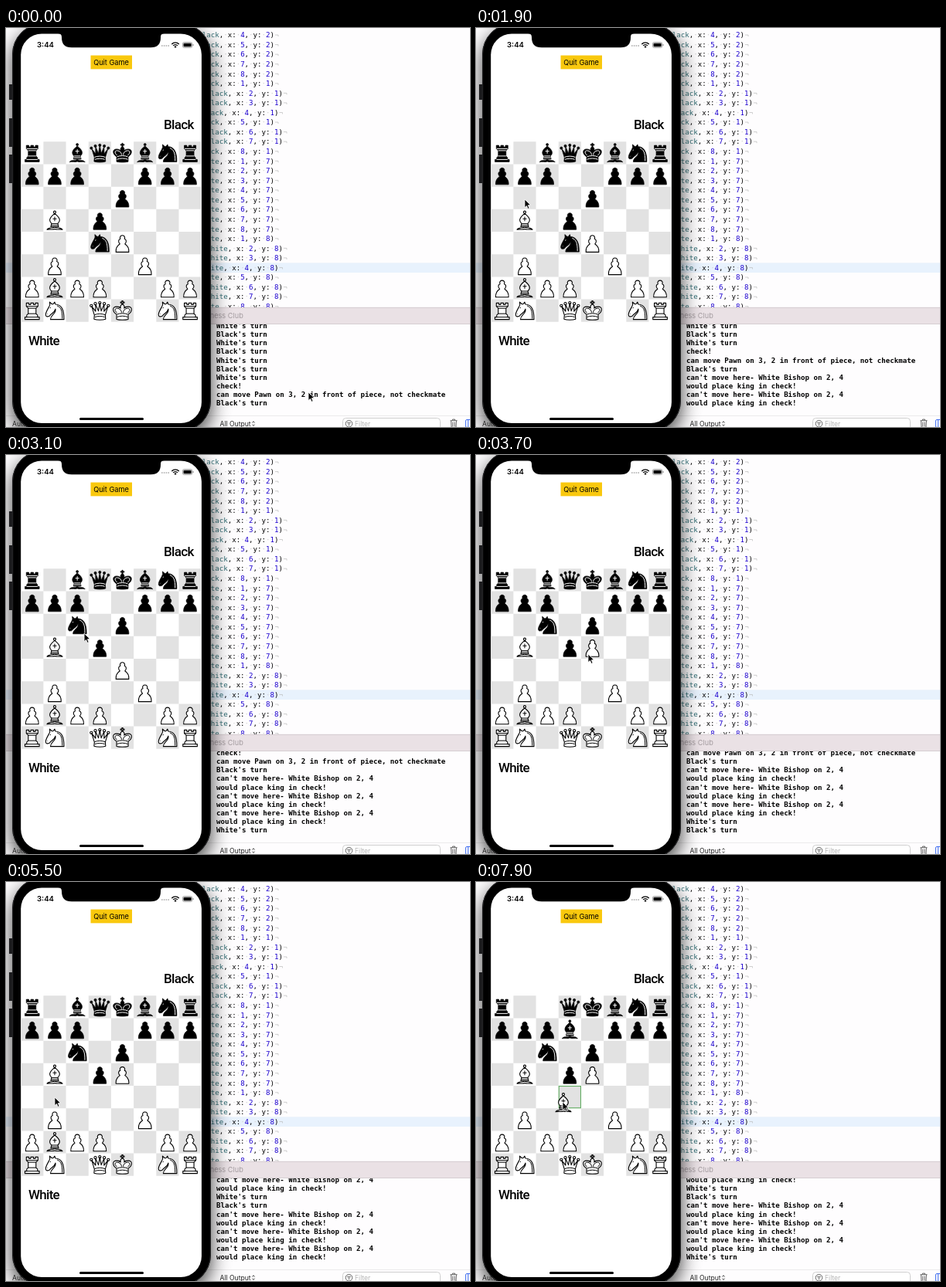
An HTML page for the animation above (8 s loop, 600 by 517 pixels).

```html
<!DOCTYPE html>
<html lang="en">
<head>
<meta charset="utf-8">
<title>Chess game</title>
<style>
  html, body { margin: 0; width: 100%; height: 100%; overflow: hidden; background: #fff; }
  svg { display: block; width: 600px; height: 517px; }
  text { white-space: pre; }
  .mono { font-family: "DejaVu Sans Mono", "Noto Sans Mono", monospace; font-size: 9.12px; }
  .ui { font-family: Inter, Roboto, sans-serif; }
  .side { font: 500 17px Roboto, sans-serif; letter-spacing: -.7px; }
</style>
</head>
<body>
<svg id="stage" viewBox="0 0 600 517">
  <defs>
    <filter id="blur" x="-40%" y="-40%" width="180%" height="180%"><feGaussianBlur stdDeviation="13"/></filter>
    <clipPath id="codeClip"><rect width="600" height="362"/></clipPath>
    <clipPath id="logClip"><rect x="265" y="384" width="335" height="118"/></clipPath>
  </defs>

  <rect width="600" height="517" fill="#fefdfe"/>
  <rect y="304.3" width="600" height="12.7" fill="#e8f2fd"/>
  <g id="code" class="mono" clip-path="url(#codeClip)"></g>

  <rect y="362" width="600" height="21.5" fill="#eae1e5"/>
  <path d="M0 362.3H600M0 383.5H600" stroke="#cfc6ca" stroke-width=".8"/>
  <text class="ui" x="257" y="376.3" font-size="9.2" fill="#a59da1">Chess Club</text>
  <g id="log" class="mono" font-weight="700" clip-path="url(#logClip)"></g>

  <g class="ui" font-size="8.6">
    <path d="M0 502.5H600" stroke="#e6e6e6" stroke-width=".8"/>
    <text x="8" y="515.5" fill="#333">Auto</text>
    <text x="276.5" y="515.5" fill="#222">All Output</text>
    <path d="M318.5 511.5l1.5-1.8 1.5 1.8M318.5 513.7l1.5 1.8 1.5-1.8" fill="none" stroke="#333" stroke-width=".9"/>
    <rect x="435.5" y="505.5" width="126" height="15" rx="4" fill="#fff" stroke="#c9c9c9" stroke-width=".9"/>
    <circle cx="443.5" cy="512.7" r="4.3" fill="none" stroke="#555" stroke-width=".9"/>
    <path d="M441 511.2h5M441.8 512.9h3.4M442.6 514.6h1.8" stroke="#555" stroke-width=".8"/>
    <text x="451" y="515.8" fill="#b4b4b4">Filter</text>
    <path d="M574.5 508.7h9M577.5 508.5v-1.4h3v1.4M575.5 509l.6 9h5.8l.6-9M577.8 510.5v6M580.2 510.5v6" fill="none" stroke="#555" stroke-width=".9"/>
    <rect x="594.5" y="507.5" width="12" height="10" rx="1.5" fill="none" stroke="#3f6df0"/>
    <path d="M597.5 508v9" stroke="#3f6df0"/>
  </g>

  <rect x="8" y="4" width="257" height="529" rx="40" opacity=".75" filter="url(#blur)"/>
  <path d="M6 73v20M6 117v37M6 164v37" stroke="#1c1c1e" stroke-width="4"/>
  <rect x="8" y="-6" width="257" height="529" rx="40" fill="#000"/>
  <rect x="8.7" y="-5.3" width="255.6" height="527.6" rx="39" fill="none" stroke="#2c2c2e"/>
  <rect x="19.2" y="7.5" width="233.7" height="504.5" rx="27" fill="#fff"/>
  <path d="M67 7C71 7.3 72 9 72 12C72 21 76 25.3 85 25.3H187C196 25.3 200 21 200 12C200 9 201 7.3 205 7Z"/>

  <text class="ui" x="40" y="25" font-size="9.6" font-weight="600">3:44</text>
  <path d="M201 23h10" stroke="#aaa" stroke-width="1.6" stroke-dasharray="1.6 1.2"/>
  <path d="M214.3 21a6.3 6.3 0 0 1 9.4 0M216.1 22.9a3.9 3.9 0 0 1 5.8 0" fill="none" stroke="#000" stroke-width="1.4"/>
  <path d="M217.5 24.2a2 2 0 0 1 3 0l-1.5 1.8z"/>
  <rect x="228.4" y="18.6" width="12.4" height="6.8" rx="2" fill="none" stroke="#777" stroke-width=".7"/>
  <rect x="229.5" y="19.7" width="10.2" height="4.6" rx="1"/>
  <path d="M241.9 21v2" stroke="#777"/>

  <rect x="109.5" y="35.5" width="53.5" height="17.8" fill="#f9c80e"/>
  <text class="ui" x="136" y="47.6" font-size="9.2" text-anchor="middle">Quit Game</text>
  <text class="side" x="242.6" y="131" text-anchor="end">Black</text>
  <text class="side" x="29" y="411">White</text>
  <rect x="95" y="505" width="83" height="3" rx="1.5"/>

  <g id="board"></g>
  <rect id="target" width="28.2" height="28.2" fill="none" stroke="#62ad62" stroke-width="1.1"/>
  <g id="pieces"></g>
  <path id="cursor" d="M0 0V10.6L2.5 8.4L4.2 12.3L6 11.5L4.3 7.7L7.6 7.5Z" stroke="#fff" stroke-width=".8"/>
</svg>

<script>
const LOOP = 8000, CELL = 29.18, LEFT = 19.2, TOP = 147.3;
const $ = id => document.getElementById(id);
const center = (col, row) => [LEFT + (col + .5) * CELL, TOP + (row + .5) * CELL];

// Each piece: outline, then inner lines; coordinates are relative to its square's centre.
const SHAPES = {
  p: ['M-8.3 11.8C-8.8 6 -5.5 2.7 -3.2 1.2C-6 -1.5 -5 -4.6 -2.7 -5.3C-4 -8 -2 -9.8 0 -9.8C2 -9.8 4 -8 2.7 -5.3C5 -4.6 6 -1.5 3.2 1.2C5.5 2.7 8.8 6 8.3 11.8Z', ''],
  r: ['M-9.3 11.5V8.5H-7V6L-5 4V-3L-7.5 -5.5V-9.8H-4.2V-7.8H-1.8V-9.8H1.8V-7.8H4.2V-9.8H7.5V-5.5L5 -3V4L7 6V8.5H9.3V11.5Z',
    'M-7 8.5H7M-5 4H5M-5 -3H5M-7 -5.5H7'],
  n: ['M.8 -8.2C8 -8 12.3 -2 12 11.5H-5.5C-5.5 5 2 5 1 -2C0 2 -3 3.5 -5 5C-6.5 6.5 -7 8 -8.5 7.5C-11 8.5 -12 6.5 -11.5 4C-11 1.5 -7.5 -4.5 -7.5 -4.5L-6.2 -7.5L-6.5 -11L-3.5 -8.4L-2 -8.4L0 -11Z',
    'M3 -6.3C8 -4.5 10 0 9.8 10.5M-6.2 -3.2L-5 -4M-9.5 4.5L-9 4'],
  b: ['M-1.5 -10.8A1.5 1.5 0 1 1 1.5 -10.8A1.5 1.5 0 1 1 -1.5 -10.8ZM-4 4C-8 .5 -7 -3.5 0 -9C7 -3.5 8 .5 4 4L5 8H-5ZM-10 11.8C-8 8.5 -4 10.5 0 8.5C4 10.5 8 8.5 10 11.8C6 10.8 3 12.3 0 11C-3 12.3 -6 10.8 -10 11.8Z',
    'M0 -4.8V.8M-2.5 -2.2H2.5M-4 4H4M-4.5 6.2H4.5'],
  q: ['M-7.5 11L-7 6L-10.5 -5.5L-5.5 1V-8L-1.8 .5L0 -9.5L1.8 .5L5.5 -8V1L10.5 -5.5L7 6L7.5 11C4 12.4 -4 12.4 -7.5 11Z'
    + [[-11, -6.3], [-5.8, -9], [0, -10], [5.8, -9], [11, -6.3]].map(([x, y]) => `M${x - 1.6} ${y}a1.6 1.6 0 1 1 3.2 0a1.6 1.6 0 1 1 -3.2 0Z`).join(''),
    'M-6.8 5.5C-3 3.8 3 3.8 6.8 5.5M-6.3 8.4C-3 7 3 7 6.3 8.4'],
  k: ['M-.6 -8V-9.9H-2.4V-11.1H-.6V-12.6H.6V-11.1H2.4V-9.9H.6V-8ZM-7.5 11.3V5C-13 1.5 -13.5 -5 -7.5 -5C-4.5 -5 -2.5 -3.5 -2.3 -3C-3 -6 -1.5 -8 0 -8C1.5 -8 3 -6 2.3 -3C2.5 -3.5 4.5 -5 7.5 -5C13.5 -5 13 1.5 7.5 5V11.3C4 12.4 -4 12.4 -7.5 11.3Z',
    'M-7 5C-4 3.2 4 3.2 7 5M-7 8.4C-4 6.6 4 6.6 7 8.4M-6.8 3C-10.3 .8 -10.3 -3 -7 -3C-3.2 -3 -1.2 0 -1 2.6M6.8 3C10.3 .8 10.3 -3 7 -3C3.2 -3 1.2 0 1 2.6']
};

const SETUP = ['r.bqkbnr', 'ppp..ppp', '....p...', '.B.p....', '...nP...', '.P...P..', 'PBPP..PP', 'RN.QK.NR'];

// [pick time, drop time, from col, from row, to col, to row]; without a goal the piece snaps back
const DRAGS = [
  [500, 800, 4, 2],
  [1500, 1900, 1, 1],
  [2300, 2800, 3, 4, 2, 2],
  [3400, 3600, 4, 4, 4, 3],
  [4100, 4300, 3, 3],
  [4500, 5000, 2, 2],
  [5200, 5500, 2, 2],
  [6400, 7000, 2, 0, 3, 1],
  [7500, 8000, 1, 6]
];

const PATH = `0 391 472,400 151 224,500 151 222,750 150 250,800 150 250,1000 152 230,1200 153 206,
1500 64 192,1800 63 222,2000 63 222,2300 121 276,2600 109 252,2800 92 220,3000 92 222,3400 150 280,
3600 147 252,3700 145 258,3900 143 256,4100 122 251,4300 121 279,4500 88 229,4600 88 229,4900 119 281,
5000 119 281,5200 92 222,5500 63 279,5900 70 230,6400 91 161,6700 117 189,7000 121 190,7100 118 200,
7400 62 336,7500 62 336,7900 112 285,8000 112 285`.split(',').map(k => k.trim().split(' ').map(Number));

const WHITE = "White's turn", BLACK = "Black's turn";
const REFUSED = ["can't move here- White Bishop on 2, 4", 'would place king in check!'];
const LOG = [
  [0, WHITE, BLACK, WHITE, BLACK, WHITE, BLACK, WHITE, 'check!',
    'can move Pawn on 3, 2 in front of piece, not checkmate', BLACK],
  [800, ...REFUSED], [1900, ...REFUSED], [2800, ...REFUSED],
  [3000, WHITE], [3600, BLACK],
  [4300, ...REFUSED], [5000, ...REFUSED], [5500, ...REFUSED],
  [7000, WHITE]
];

function cursorAt(t) {
  const i = Math.max(1, PATH.findIndex(k => k[0] >= t));
  const [t0, x0, y0] = PATH[i - 1], [t1, x1, y1] = PATH[i];
  const u = (t - t0) / (t1 - t0), e = u * u * (3 - 2 * u);
  return [x0 + (x1 - x0) * e, y0 + (y1 - y0) * e];
}

function buildCode() {
  const span = (s, color) => `<tspan fill="${color}">${s}</tspan>`;
  const gap = span('·', '#d0d0d0');
  const line = (i, side, x, y, extra) => {
    const end = 347 + extra * 5.49, base = 12.3 + 12.56 * i;
    return `<text x="${end}" y="${base}" text-anchor="end">${span(side, '#326d74')},${gap}x:${gap}${span(x, '#1c00cf')},${gap}y:${gap}${span(y, '#1c00cf')})</text>`
      + `<path d="M${end + 1} ${base - 3.3}h4v2" fill="none" stroke="#bbb" stroke-width=".7"/>`;
  };
  const extra = [0, 2, 2, 1, 0, 2, 2, 0];   // name length beyond four letters
  let out = '', i = 0;
  const rank = (side, y, from, named) => {
    for (let x = from; x <= 8; x++) out += line(i++, side, x, y, named ? extra[x - 1] : 0);
  };
  rank('black', 2, 4, false);
  rank('black', 1, 1, true);
  rank('white', 7, 1, false);
  rank('white', 8, 1, true);
  $('code').innerHTML = out;
}

function buildBoard() {
  let d = '';
  for (let n = 0; n < 64; n++) {
    const col = n % 8, row = n >> 3;
    if ((col + row) % 2) d += `M${LEFT + col * CELL} ${TOP + row * CELL}h${CELL}v${CELL}h${-CELL}Z`;
  }
  $('board').innerHTML = `<path d="${d}" fill="#e2e2e2"/>`;
}

const pieces = [];
function buildPieces() {
  SETUP.forEach((line, row) => [...line].forEach((c, col) => {
    if (c === '.') return;
    const black = c === c.toLowerCase(), [outline, lines] = SHAPES[c.toLowerCase()];
    const el = document.createElementNS('http://www.w3.org/2000/svg', 'g');
    el.innerHTML = `<path d="${outline}" fill="${black ? '#000' : '#fff'}" stroke="#000" stroke-width="${black ? .7 : 1.1}" stroke-linejoin="round"/>`
      + `<path d="${lines}" fill="none" stroke="${black ? '#fff' : '#000'}" stroke-width="1"/>`;
    $('pieces').append(el);
    pieces.push({ el, col, row });
  }));
}

function drawPieces(t, [cx, cy]) {
  const now = pieces.map(p => ({ el: p.el, col: p.col, row: p.row, dx: 0, dy: 0 }));
  let dragging = false;
  for (const [pick, drop, col, row, toCol, toRow] of DRAGS) {
    if (t < pick) break;
    const p = now.find(q => q.col === col && q.row === row);
    if (t < drop) {
      const [px, py] = cursorAt(pick);
      p.dx = cx - px;
      p.dy = cy - py;
      p.held = dragging = true;
    } else if (toCol !== undefined) {
      p.col = toCol;
      p.row = toRow;
    }
  }
  for (const p of now) {
    const [x, y] = center(p.col, p.row);
    p.el.setAttribute('transform', `translate(${x + p.dx} ${y + p.dy})`);
    if (p.held && p.el !== $('pieces').lastChild) $('pieces').append(p.el);
  }
  const target = $('target');
  target.style.display = dragging ? '' : 'none';
  target.setAttribute('x', LEFT + Math.floor((cx - LEFT) / CELL) * CELL + .5);
  target.setAttribute('y', TOP + Math.floor((cy - TOP) / CELL) * CELL + .5);
}

function drawLog(t) {
  const lines = LOG.filter(e => e[0] <= t).flatMap(e => e.slice(1)).slice(-10);
  $('log').innerHTML = lines.map((s, i) => `<text x="272" y="${389.1 + i * 11.11}">${s}</text>`).join('');
}

let shown = -1;
function draw(ms) {
  const t = Math.floor(ms % LOOP / 100) * 100;   // the picture moves ten times a second
  if (t !== shown) {
    shown = t;
    const pos = cursorAt(t);
    drawPieces(t, pos);
    drawLog(t);
    $('cursor').setAttribute('transform', `translate(${pos})`);
  }
}

buildCode();
buildBoard();
buildPieces();
const start = performance.now();
function tick() {
  draw(performance.now() - start);
  requestAnimationFrame(tick);
}
tick();
</script>
</body>
</html>
```
